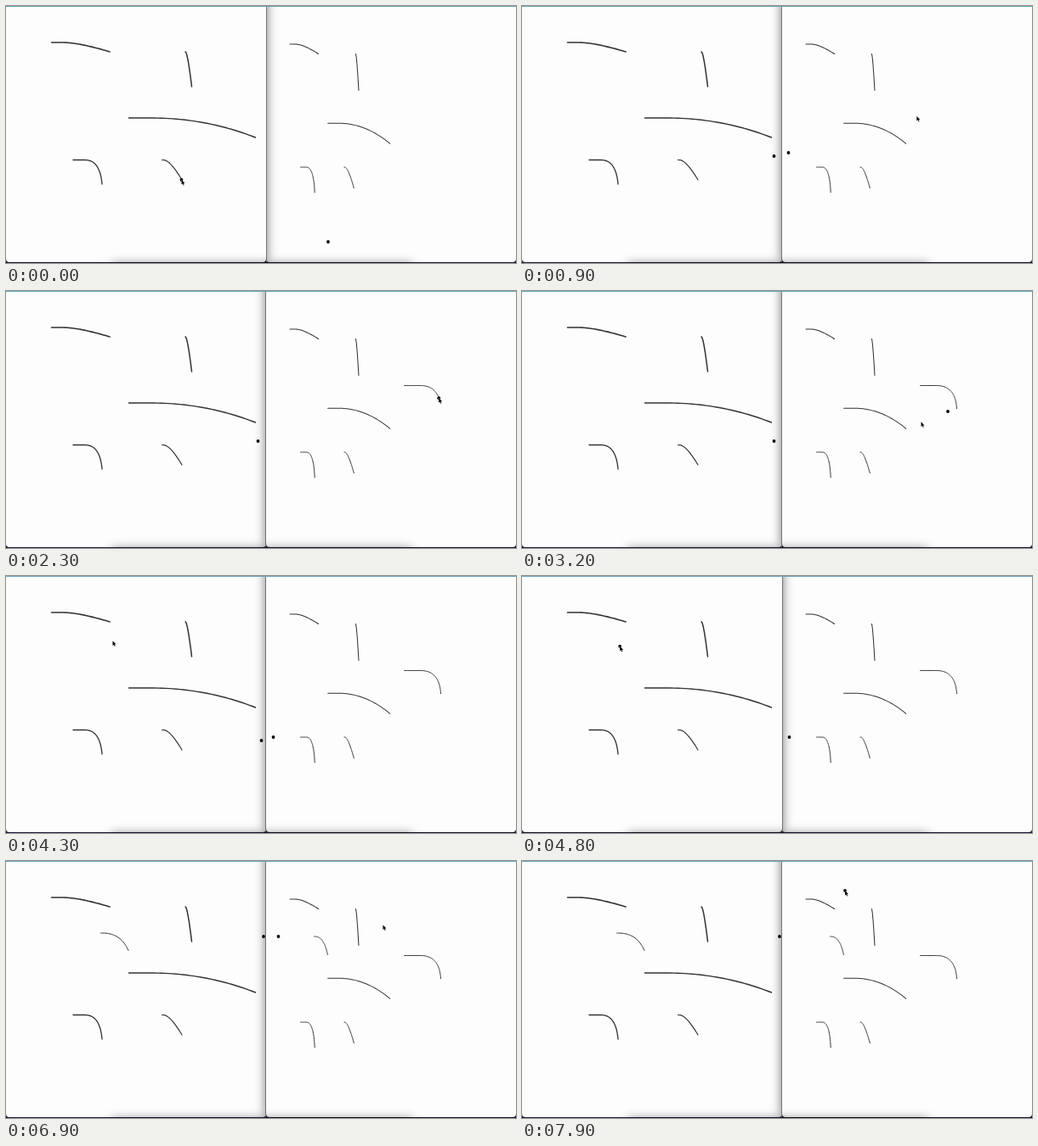
An HTML page with a canvas that plays this animation: 600 by 303 pixels, repeating every 8000 ms.

```html
<!DOCTYPE html>
<html lang="en">
<head>
<meta charset="utf-8">
<title>Shared sketch</title>
<style>
html, body { margin: 0; height: 100%; overflow: hidden; }
canvas { display: block; width: 100vw; height: 100vh; }
</style>
</head>
<body>
<canvas id="stage" width="600" height="303"></canvas>
<script>
const ctx = document.getElementById("stage").getContext("2d");

// Both windows show one sketch; the right one squeezes it
const left = { x: 0, w: 306, line: 1.6, thin: .1, map: (x, y) => [x, y] };
const right = { x: 306, w: 294, line: 1.05, thin: .02, map: (x, y) => [307.75 + .4906 * x, 1.047 * y] };

// A stroke runs level to `flat`, then bends through `corner` to its end
const stroke = (x, y, flat, corner, endX, endY, home, from = -1, to = 0) =>
  ({ x, y, flat, corner, endX, endY, home, from, to });
const strokes = [
  stroke(53.5, 43, 66, 86, 122, 54),
  stroke(211, 54, 211, 213.5, 218.5, 95),
  stroke(144.5, 132, 170, 235, 293.5, 155),
  stroke(79, 181.5, 93, 110.5, 113, 210),
  stroke(183.5, 181.5, 185, 193, 207, 205),
  stroke(327.2, 106.5, 367, 412, 415.3, 132.5, right, 1800, 2500),
  stroke(111.5, 85, 114, 135, 144, 105.5, left, 4900, 5600)
];
const [arcR, arcL] = strokes.slice(-2);

function pointOn(s, u) {
  if (u < .25) return [s.x + (s.flat - s.x) * u * 4, s.y];
  const k = (u - .25) / .75, j = 1 - k;
  return [j * j * s.flat + 2 * j * k * s.corner + k * k * s.endX, s.y + k * k * (s.endY - s.y)];
}

function progress(t, from, to) {
  const k = Math.max(0, Math.min(1, (t - from) / (to - from)));
  return k * k * (3 - 2 * k);
}

// Pointer moves: start, end and a path
const go = (x, y) => (k, [x0, y0]) => [x0 + (x - x0) * k, y0 + (y - y0) * k];
const trace = s => k => s.home.map(...pointOn(s, k));
const moves = [
  [300, 500, go(450, 151)], [600, 1000, go(467, 126)], [1100, 1500, go(468, 111.5)],
  [arcR.from, arcR.to, trace(arcR)],
  [3100, 3200, go(469.5, 154.3)], [3200, 3400, go(271.5, 203)],
  [3600, 3900, go(168, 112)], [4000, 4300, go(125.5, 76.5)], [4600, 4900, go(arcL.x, arcL.y)],
  [arcL.from, arcL.to, trace(arcL)],
  [6200, 6400, go(431, 81)], [6600, 6900, go(443.5, 75.5)],
  [7100, 7600, go(387, 39)], [7700, 7900, go(380, 35)]
];
const pointerAt = t => moves.reduce((p, [from, to, path]) =>
  t > from ? path(progress(t, from, to), p) : p, [206.5, 205]);

// Where each dot rests; without a place it follows the pointer
left.rests = [[0], [400, 296.5, 177], [3400, 300.5, 194], [4700], [6300, 303, 89]];
right.rests = [[0, 379, 278], [400, 313.5, 173], [1200], [3200, 501, 142],
               [3300, 314.5, 190], [6300, 320.5, 89], [7200]];

function drawDot(win, t, pointer) {
  const [, ...place] = win.rests.filter(r => r[0] <= t).pop();
  ctx.beginPath();
  ctx.arc(...(place.length ? place : pointer), 1.9, 0, 7);
  ctx.fillStyle = "#000";
  ctx.fill();
}

function drawPane(win, shadow) {
  ctx.save();
  ctx.shadowColor = "rgba(0,0,0,.6)";
  ctx.shadowBlur = shadow;
  ctx.fillStyle = "#fdfdfd";
  ctx.beginPath();
  ctx.roundRect(win.x, -40, win.w, 342, 4);
  ctx.fill();
  ctx.restore();
}

function drawSketch(win, t) {
  ctx.save();
  ctx.beginPath();
  ctx.rect(win.x, 0, win.w, 302);
  ctx.clip();
  ctx.strokeStyle = "#333";
  ctx.lineCap = ctx.lineJoin = "round";
  strokes.forEach((s, i) => {
    const k = progress(t, s.from, s.to);
    if (!k || k < 1 && s.home !== win) return;
    ctx.beginPath();
    for (let n = 0; n <= 40; n++) ctx.lineTo(...win.map(...pointOn(s, k * n / 40)));
    ctx.lineWidth = win.line - win.thin * i;
    ctx.stroke();
  });
  ctx.restore();
}

function drawArrow([x, y]) {
  ctx.save();
  ctx.translate(x, y);
  const arrow = new Path2D("M0 0V5.6L1.3 4.4L2.3 6.6L3.2 6.2L2.2 4.1H4Z");
  ctx.strokeStyle = "#fff";
  ctx.lineWidth = .5;
  ctx.stroke(arrow);
  ctx.fill(arrow);
  ctx.restore();
}

function draw(now) {
  const t = Math.floor(now % 8000 / 100) * 100;
  const pointer = pointerAt(t);
  const rightActive = t >= 800 && t < 4400 || t >= 6800;
  const [back, front] = rightActive ? [left, right] : [right, left];

  ctx.fillStyle = "#1c1838";
  ctx.fillRect(0, 0, 600, 303);
  drawPane(back, 0);
  drawPane(front, 13);
  ctx.fillStyle = "#777";
  ctx.fillRect(rightActive ? 305 : 306, 0, 1, 302);

  // Soft shade rising from below
  ctx.save();
  ctx.shadowColor = "rgba(0,0,0,.4)";
  ctx.shadowBlur = 12;
  ctx.fillRect(124, 303, 354, 20);
  ctx.restore();
  ctx.fillStyle = "#6aa6ba";
  ctx.fillRect(0, 0, 600, 1);

  for (const win of [left, right]) {
    drawSketch(win, t);
    drawDot(win, t, pointer);
  }
  drawArrow(pointer);
  requestAnimationFrame(draw);
}
requestAnimationFrame(draw);
</script>
</body>
</html>
```
